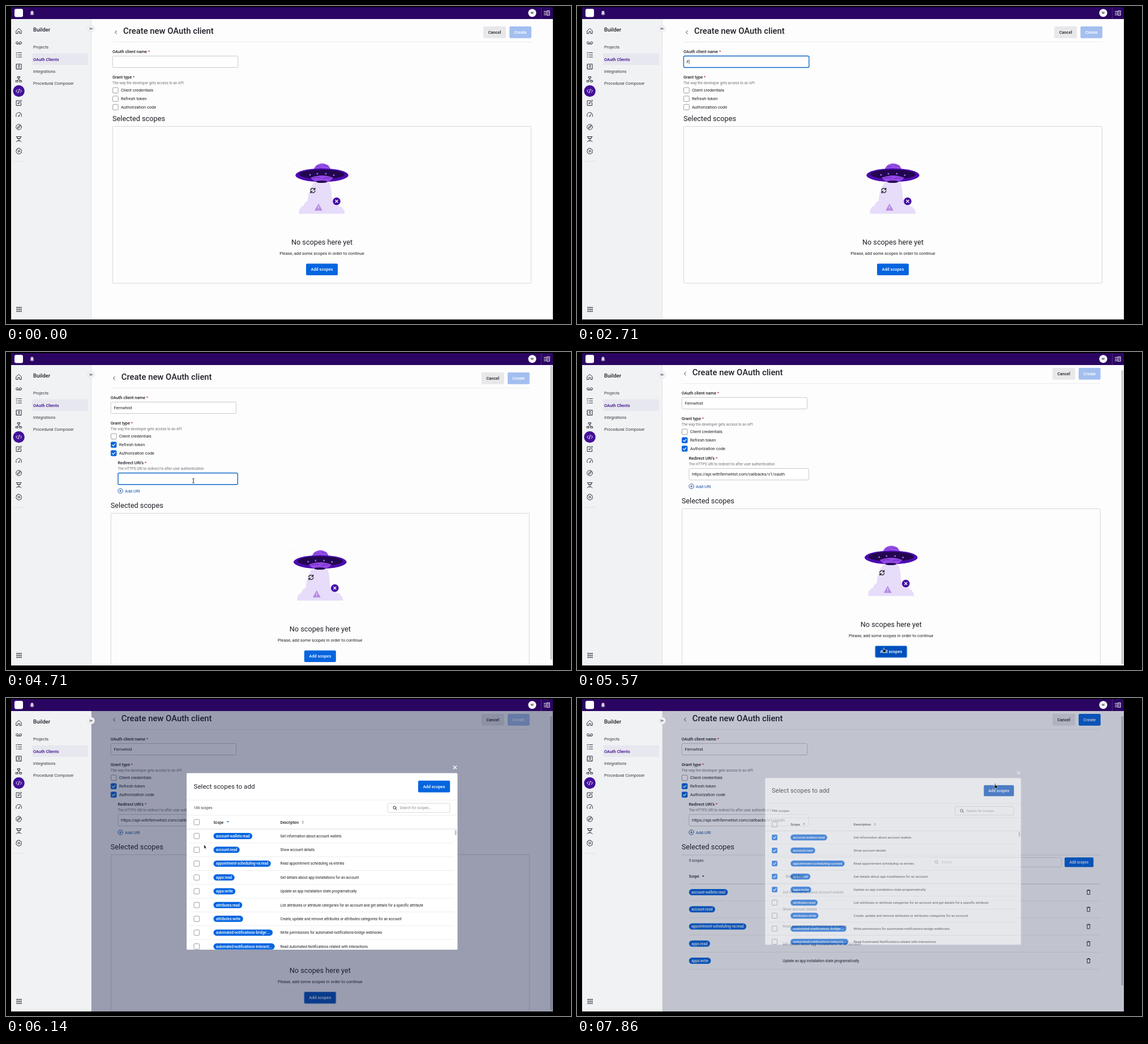
An HTML page for the animation above (8000 ms loop, 998x561 px).

```html
<!DOCTYPE html>
<html lang="en">
<head>
<meta charset="utf-8">
<title>Create new OAuth client</title>
<style>
  html, body { margin: 0; width: 100%; height: 100%; overflow: hidden; background: #000; }
  svg { display: block; width: 998px; height: 561px; font-family: Roboto, sans-serif; }
  .icon { fill: none; stroke: #30303a; stroke-width: 1; stroke-linecap: round; stroke-linejoin: round; }
</style>
</head>
<body>
<svg id="stage" viewBox="0 0 998 561"></svg>
<script>
const LOOP = 8000, STEP = 1000 / 7;
const INK = '#202028', GREY = '#75757e', BLUE = '#0565df', LINE = '#d2d3d8', PURPLE = '#43109a';
const BODY = 7.42, SMALL = 6.36;
const CLIENT = 'Fernwhist';
const CALLBACK = 'https://api.withfernwhist.com/callbacks/v1/oauth';
const SCOPES = [
  ['account-wallets:read', 'Get information about account wallets'],
  ['account:read', 'Show account details'],
  ['appointment-scheduling-va:read', 'Read appointment scheduling va entries'],
  ['apps:read', 'Get details about app installations for an account'],
  ['apps:write', 'Update an app installation state programatically'],
  ['attributes:read', 'List attributes or attribute categories for an account and get details for a specific attribute'],
  ['attributes:write', 'Create, update and remove attributes or attributes categories for an account'],
  ['automated-notifications-bridge:...', 'Write permissions for automated-notifications-bridge webhooks'],
  ['automated-notifications-interacti...', 'Read Automated Notifications related with interactions']
];

// Pointer keys: time, x, y, shape
const POINTER = [
  [1570, 273, 131, 'arrow'], [1857, 262, 100, 'beam'], [2430, 258, 99, 'beam'], [2700, 258, 99, 'none'],
  [3420, 200, 142, 'arrow'], [3571, 175, 157, 'arrow'], [3714, 185, 162, 'arrow'], [3857, 190, 164, 'hand'],
  [4000, 190, 164, 'hand'], [4143, 190, 179, 'hand'], [4290, 191, 179, 'arrow'], [4571, 331, 227, 'beam'],
  [5000, 331, 227, 'beam'], [5143, 350, 280, 'arrow'], [5430, 530, 500, 'arrow'], [5571, 541, 525, 'hand'],
  [5900, 541, 525, 'arrow'], [6140, 350, 260, 'arrow'], [6286, 337, 244, 'hand'], [6429, 337, 268, 'hand'],
  [6571, 337, 292, 'hand'], [6714, 337, 317, 'hand'], [6857, 337, 341, 'hand'], [7000, 338, 341, 'arrow'],
  [7290, 560, 240, 'arrow'], [7571, 738, 154, 'hand'], [8000, 738, 154, 'hand']
];

const stage = document.getElementById('stage');
const ruler = document.createElement('canvas').getContext('2d');
const clamp = v => Math.max(0, Math.min(1, v));

function textWidth(s, size, weight = 400) {
  ruler.font = `${weight} 100px Roboto, sans-serif`;
  return ruler.measureText(s).width * size / 100;
}
const rect = (x, y, w, h, fill, r = 0, extra = '') =>
  `<rect x="${x}" y="${y}" width="${w}" height="${h}" rx="${r}" fill="${fill}" ${extra}/>`;
const circle = (x, y, r, fill, extra = '') => `<circle cx="${x}" cy="${y}" r="${r}" fill="${fill}" ${extra}/>`;
const ellipse = (x, y, rx, ry, fill) => `<ellipse cx="${x}" cy="${y}" rx="${rx}" ry="${ry}" fill="${fill}"/>`;
const path = (d, fill, extra = '') => `<path d="${d}" fill="${fill}" ${extra}/>`;
const icon = (x, y, d, extra = '') => `<path class="icon" transform="translate(${x} ${y})" d="${d}" ${extra}/>`;
const hline = (x1, x2, y, color = '#e4e5e9') => path(`M${x1} ${y}H${x2}`, 'none', `stroke="${color}" stroke-width=".7"`);
const group = (content, attrs) => `<g ${attrs}>${content}</g>`;

// Text is placed by the vertical middle of its capitals.
const text = (s, x, y, size = BODY, { weight = 400, fill = INK, anchor = 'start' } = {}) =>
  `<text x="${x}" y="${y + size * .355}" font-size="${size}" font-weight="${weight}" fill="${fill}" text-anchor="${anchor}">${s}</text>`;

const required = (s, x, y) => text(`${s} <tspan fill="#c8283c">*</tspan>`, x, y, BODY, { weight: 500 });

function button(label, x, y, w, h, fill = BLUE, color = '#fff', size = BODY, extra = '') {
  return rect(x, y, w, h, fill, 2, extra) +
    text(label, x + w / 2, y + h / 2, size, { weight: 500, fill: color, anchor: 'middle' });
}
function checkbox(x, y, checked) {
  const box = rect(x - 4.8, y - 4.8, 9.6, 9.6, checked ? BLUE : '#fff', 1.5, `stroke="${checked ? BLUE : '#85868f'}" stroke-width=".8"`);
  return box + (checked ? path(`M${x - 2.8} ${y}l2 2.1l3.8 -4.2`, 'none', 'stroke="#fff" stroke-width="1.2"') : '');
}
function field(x, y, w, h, value, focused, caret) {
  const end = x + 5.5 + textWidth(value, BODY);
  return rect(x, y, w, h, '#fff', 2, `stroke="${focused ? '#1269c7' : '#c3c4ca'}" stroke-width="${focused ? 1.4 : .9}"`) +
    text(value, x + 5.2, y + h / 2) +
    (caret ? path(`M${end} ${y + 6}v${h - 12}`, 'none', `stroke="${INK}" stroke-width=".7"`) : '');
}
function pill(label, x, y) {
  return rect(x, y - 5.5, textWidth(label, SMALL, 500) + 9, 11, BLUE, 5.5) +
    text(label, x + 4.5, y, SMALL, { weight: 500, fill: '#fff' });
}
const magnifier = (x, y) => icon(x, y, 'M1.4 1.4L3.3 3.3M2 -.6A2.5 2.5 0 1 1 -3 -.6A2.5 2.5 0 1 1 2 -.6');
const sortMark = (x, y, fill) => path(`M${x - 2} ${y + 1}l2 -2.3l2 2.3z`, fill);

function topBar() {
  return rect(9, 2, 957, 21, '#2b0562') + rect(15, 5, 15, 14.5, '#fff', 3) +
    path('M42.5 15.2h7l-1 -1.5v-2.5a2.5 2.7 0 0 0 -5 0v2.5zM45 16h2l-1 1z', '#d8cdea') +
    circle(929.5, 12.3, 7, '#fff') + text('W', 929.5, 12.3, 6, { weight: 500, anchor: 'middle' }) +
    path('M945.5 2v21', 'none', 'stroke="#56398a" stroke-width=".8"') +
    path('M950 9.5h4.5M950 12.5h4.5M950 15.5h4.5', 'none', 'stroke="#fff"') +
    rect(955.6, 8.6, 4.4, 7.6, 'none', 0, 'stroke="#fff"') + path('M957 10.8h2M957 13h2', 'none', 'stroke="#fff" stroke-width=".7"');
}

function sidebar() {
  const ring = r => `M${r} 0A${r} ${r} 0 1 1 ${-r} 0A${r} ${r} 0 1 1 ${r} 0`;
  const rail = [
    [44, 'M-4.5 -.5L0 -4.5L4.5 -.5V4.5H1.5V1H-1.5V4.5H-4.5Z'],
    [65, 'M-1 0A2 2 0 1 1 -5 0A2 2 0 1 1 -1 0M5 0A2 2 0 1 1 1 0A2 2 0 1 1 5 0M-3 2H3'],
    [86, 'M-5 -3.5l1 1l1.5 -2M-1 -3.5H5M-4.5 .3h1.5M-1 .3H5M-4.5 4h1.5M-1 4H5'],
    [107, 'M-4 -4.5H4.5V4.5H-4ZM-5 -2h1M-5 2h1M1.6 -1.3A1.4 1.4 0 1 1 -1.2 -1.3A1.4 1.4 0 1 1 1.6 -1.3M-2 3Q.2 0 2.5 3'],
    [129, 'M-2 -4.5H2V-2H-2ZM0 -2V0L-3 2.5M0 0L3 2.5M-5 2.5h3.5V5H-5ZM1.5 2.5H5V5H1.5Z'],
    [171, 'M1 -4H-4.5V4.5H4V0M-1.5 1.5L-1 -.5L4 -5L5.2 -3.8L.5 1Z'],
    [192, 'M-4.5 3A5 5 0 1 1 4.5 3M0 2L2.5 -1.5M-1 2.5H1'],
    [213.5, ring(4.8) + 'M2.5 -2.5L1 1L-2.5 2.5L-1 -1Z'],
    [235, 'M-4.5 -4.5H4.5M-3 -4.5V-1.5H3V-4.5M-2 -1.5Q0 3 2 -1.5M-4.5 4.5Q0 -.5 4.5 4.5M-1 3H1'],
    [256, ring(1.6) + 'M-1.5 -5H1.5L2 -3.5L4 -3L5 -.5L4 1L4.5 3L2.5 4L1.5 5H-1.5L-2 3.8L-4 3L-5 .5L-4 -1L-4.5 -3L-2.5 -3.5Z']
  ];
  const menu = [['Projects', 72.5], ['OAuth Clients', 94], ['Integrations', 115], ['Procedural Composer', 136.5]];
  let out = rect(9, 23, 142, 530, '#f0f2f4') + path('M150.5 23V553', 'none', 'stroke="#dfe1e6" stroke-width=".8"');
  out += rail.map(([y, d]) => icon(22.6, y, d)).join('');
  out += circle(22.6, 150, 10.2, PURPLE) + icon(22.6, 150, 'M-2.5 -2.5L-5 0L-2.5 2.5M2.5 -2.5L5 0L2.5 2.5M1 -3.5L-1 3.5', 'style="stroke:#fff"');
  out += hline(13, 33, 274, '#d5d7dd');
  for (let i = 0; i < 9; i++) out += rect(18.6 + i % 3 * 3.4, 530.8 + Math.floor(i / 3) * 3.4, 2.1, 2.1, '#30303a');
  out += text('Builder', 48, 42, 9.54, { weight: 500 }) + rect(46, 83.5, 99, 20.5, '#e7e7ef', 2);
  out += menu.map(([s, y], i) => text(s, 48, y, BODY, i === 1 ? { weight: 500, fill: '#3b0b8c' } : { fill: '#3a3a44' })).join('');
  return out;
}
const collapseKnob = () => circle(150.5, 40, 6, '#f4f4f7', 'stroke="#d5d6dc" stroke-width=".6"') +
  icon(150.5, 40, 'M-2.2 -2V2M2.5 0H-.8M.8 -1.7L-.8 0L.8 1.7', 'style="stroke-width:.7"');

function saucer() {
  let out = path('M544 311C536 321 534 332 533 341C533 347 526 345 526 352C520 354 517 359 517.5 366.5H598.5C598 359 594 354 586 352C577 349 576 343 575 333C575 324 573 317 571 311Z', '#e7dcfa');
  out += path('M543 292C544 273 573 273 574 292Z', '#9650e6') + path('M548 283q5 2 9 -1M560 281q5 3 10 1M550 288q8 -3 14 0', 'none', 'stroke="#6f25c5" stroke-width=".9"');
  out += ellipse(558, 298.5, 46.8, 12, '#4d0bb0') + ellipse(558, 297, 40, 8.6, '#22074f');
  out += path('M538 303Q558 295 578 303Q571 312 558 311.5Q545 312 538 303Z', '#9448e4');
  out += path('M542 304q8 -3 14 -1M560 305q8 -3 13 -1', 'none', 'stroke="#6420b8" stroke-width=".9"') + ellipse(557.5, 310, 10, 2, '#22074f');
  out += [[537, 298], [550, 296], [565, 296], [579, 298.5]].map(([x, y]) => circle(x, y, 1.4, '#a568ec')).join('');
  out += [[606, 272], [511, 279], [595, 281], [521, 330]].map(([x, y]) => circle(x, y, .7, '#dcd6e6')).join('');
  out += icon(542, 325.5, 'M-4 -.5A4 4 0 0 1 3.4 -2M3.8 -4.5V-1.7H1M4 .5A4 4 0 0 1 -3.4 2M-3.8 4.5V1.7H-1', 'style="stroke:#17171d;stroke-width:1.2"');
  out += path('M552 348.5L559 361H545Z', '#b58ae2') + path('M552 353v3.8M552 358.2v1', 'none', 'stroke="#f4edff" stroke-width="1.2"');
  return out + circle(584, 344.5, 6.8, '#420ca4') + path('M581.5 342l5 5m0 -5l-5 5', 'none', 'stroke="#fff" stroke-width="1.3"');
}

function emptyScopes(s) {
  return rect(188.5, 212.5, 739, 276.5, 'none', 1, `stroke="${LINE}" stroke-width=".9"`) + saucer() +
    text('No scopes here yet', 558, 416, 12.72, { anchor: 'middle' }) +
    text('Please, add some scopes in order to continue', 558, 436, BODY, { anchor: 'middle' }) +
    button('Add scopes', 530, 454.5, 56, 20.5, s.opening ? '#0050bd' : BLUE, '#fff', BODY, s.opening ? 'stroke="#6c9fe8" stroke-width="1"' : '');
}
function chosenScopes() {
  let out = hline(188, 928, 213, LINE) + text('5 scopes', 201, 222.5, SMALL, { weight: 500, fill: '#55555f' });
  out += rect(628, 217.5, 231, 16.5, '#fff', 2, `stroke="${LINE}" stroke-width=".8"`) + magnifier(638, 225.5) + text('Search', 647, 225.7, SMALL, { fill: '#90909a' });
  out += button('Add scopes', 864.5, 217.3, 51, 17, BLUE, '#fff', SMALL);
  out += text('Scope', 201, 251, SMALL, { weight: 500 }) + sortMark(226, 250, INK) + text('Description', 372, 251, SMALL, { weight: 500 }) + hline(201, 927, 264, '#b9bbc4');
  SCOPES.slice(0, 5).forEach(([name, about], i) => {
    const y = 278.5 + 30.25 * i;
    out += pill(name, 201, y) + text(about, 366.5, y, SMALL) + hline(201, 927, y + 15.1);
    out += icon(906.7, y, 'M-3 -3H3M-1 -4H1M-2.3 -3V4H2.3V-3');
  });
  return out;
}

function page(s) {
  let form = icon(194, 46.3, 'M1.3 -2.7L-1.3 0L1.3 2.7') + text('Create new OAuth client', 207, 44.2, 14.84, { weight: 500 });
  form += button('Cancel', 843, 36, 40, 20.7, '#e8e8ea', INK) + button('Create', 889.3, 36, 38.7, 20.7, s.saved ? BLUE : '#a3bff0') + hline(188, 928, 63.5);
  form += required('OAuth client name', 188, 80) + field(188.4, 88.3, 221.4, 20.2, s.name, s.nameFocus, s.nameCaret);
  form += required('Grant type', 188, 125.5) + text('The way the developer gets access to an API', 188, 136, SMALL, { fill: GREY });
  ['Client credentials', 'Refresh token', 'Authorization code'].forEach((label, i) => {
    const y = 148.8 + 14.85 * i;
    form += checkbox(193.4, y, s.grants[i]) + text(label, 203, y);
  });
  if (s.redirect) {
    form += required("Redirect URI's", 200.7, 195) + text('The HTTPS URI to redirect to after user authentication', 200.7, 205.7, SMALL, { fill: GREY });
    form += field(201.1, 213.5, 211.4, 20.3, s.uri, s.uriFocus, false);
    form += circle(205.3, 245, 4.2, 'none', 'stroke="#174f9d" stroke-width=".9"') + path('M203.2 245h4.2M205.3 242.9v4.2', 'none', 'stroke="#174f9d" stroke-width=".9"') + text('Add URI', 213.3, 245, BODY, { fill: '#174f9d' });
  }
  const scopes = text('Selected scopes', 188, 198, 12.72) + (s.saved ? chosenScopes() : emptyScopes(s));
  form += group(scopes, `transform="translate(0 ${s.redirect ? 72 : 0})"`);
  const bar = s.redirect ? rect(961.5, 24 + s.scroll, 3.2, s.saved ? 475 : 519, '#c4c6cc', 1.6) : '';
  return rect(151, 23, 815, 530, '#fdfdfd') + group(form, `transform="translate(${s.redirect ? -3.2 : 0} ${-s.scroll})"`) + bar;
}

function modal(s) {
  const p = s.modal;
  if (p <= 0) return '';
  let rows = '';
  SCOPES.forEach(([name, about], i) => {
    const y = 243.5 + 24.35 * i;
    rows += checkbox(336.8, y, i < s.picked) + pill(name, 366.5, y) + text(about, 484.5, y, SMALL) + hline(324, 791, y + 12.2);
  });
  let out = rect(319, 132.5, 478.5, 311.5, '#fff', 1.5) + path('M790 119.5l6 6m0 -6l-6 6', 'none', 'stroke="#fff" stroke-width="1.2"');
  out += text('Select scopes to add', 331.5, 156, 11.66) + button('Add scopes', 728, 145.8, 56.3, 20.7, s.saved ? '#0050bd' : BLUE) + hline(319, 797.5, 180);
  out += text('146 scopes', 331.5, 194, SMALL, { weight: 500, fill: '#62626c' });
  out += rect(674, 185.7, 110, 16.2, '#fff', 2, `stroke="${LINE}" stroke-width=".9"`) + magnifier(687, 194) + text('Search for scopes...', 695.5, 194, SMALL, { fill: '#90909a' });
  out += hline(319, 797.5, 207) + checkbox(336.8, 219, false) + text('Scope', 366.5, 219.3, SMALL, { weight: 500 }) + sortMark(391.8, 218, BLUE);
  out += text('Description', 484.5, 219.3, SMALL, { weight: 500 }) + sortMark(524.3, 217.6, '#a0a1aa') + path('M522.5 219.8l1.8 2.2l1.8 -2.2z', '#a0a1aa');
  out += rect(319, 230.5, 478.5, 1.5, '#e6e7eb') + group(rows, 'clip-path="url(#modalClip)"') + rect(792.8, 233, 3, 9, '#c4c6cc', 1.5);
  const scale = .86 + .14 * p;
  return rect(151, 23, 815, 530, '#162048', 0, `opacity="${.43 * p}"`) +
    group(out, `opacity="${p}" transform="translate(558.2 288) scale(${scale}) translate(-558.2 -288)"`);
}

function pointer(t) {
  const i = POINTER.findLastIndex(k => k[0] <= t);
  if (i < 0) return '';
  const a = POINTER[i], b = POINTER[i + 1] || a;
  const u = b === a ? 0 : (t - a[0]) / (b[0] - a[0]);
  const x = a[1] + (b[1] - a[1]) * u, y = a[2] + (b[2] - a[2]) * u;
  const outline = 'stroke="#fff" stroke-width=".6"';
  const shapes = {
    none: '',
    arrow: path('M0 -1V6L1.5 4.7L2.6 7L3.7 6.5L2.6 4.3H4.6Z', '#111', outline),
    hand: path('M0 -3Q1 -4 1.5 -3V0L4 .4Q5 .8 4.6 3L4 5H.5L-2 1.8Q-1.8 .6 0 1.8Z', '#111', outline),
    beam: path('M-1.8 -3.6Q0 -3.6 0 -2.6Q0 -3.6 1.8 -3.6M0 -2.6V3M-1.8 4Q0 4 0 3Q0 4 1.8 4', 'none', 'stroke="#111" stroke-width=".9"')
  };
  return group(shapes[a[3]], `transform="translate(${x} ${y})"`);
}

function stateAt(t) {
  const typed = Math.round(CLIENT.length * clamp((t - 2600) / 820));
  return {
    name: CLIENT.slice(0, typed),
    nameFocus: t >= 1990 && t < 3980,
    nameCaret: t >= 1990 && t < 3980,
    grants: [false, t >= 3980, t >= 4130],
    redirect: t >= 4130,
    uri: t >= 4990 ? CALLBACK : '',
    uriFocus: t >= 4700 && t < 5560,
    scroll: 8 * clamp((t - 5100) / 180),
    opening: t >= 5560 && t < 6200,
    modal: t < 7760 ? clamp((t - 5590) / 250) : 1 - clamp((t - 7760) / 245),
    picked: [6280, 6420, 6565, 6705, 6850].filter(k => t >= k).length,
    saved: t >= 7760
  };
}

function draw(t) {
  const s = stateAt(t);
  stage.innerHTML = `<defs><clipPath id="window"><rect x="9" y="23" width="957" height="530"/></clipPath>
    <clipPath id="modalClip"><rect x="319" y="232" width="478.5" height="212"/></clipPath></defs>` +
    rect(0, 0, 998, 561, '#000') +
    group(page(s) + modal(s) + sidebar() + collapseKnob(), 'clip-path="url(#window)"') + topBar() + pointer(t);
}

let shown = -1;
function tick() {
  const step = Math.floor((performance.now() % LOOP + 5) / STEP) % 56;
  if (step !== shown) draw((shown = step) * STEP);
  requestAnimationFrame(tick);
}
tick();
</script>
</body>
</html>
```
